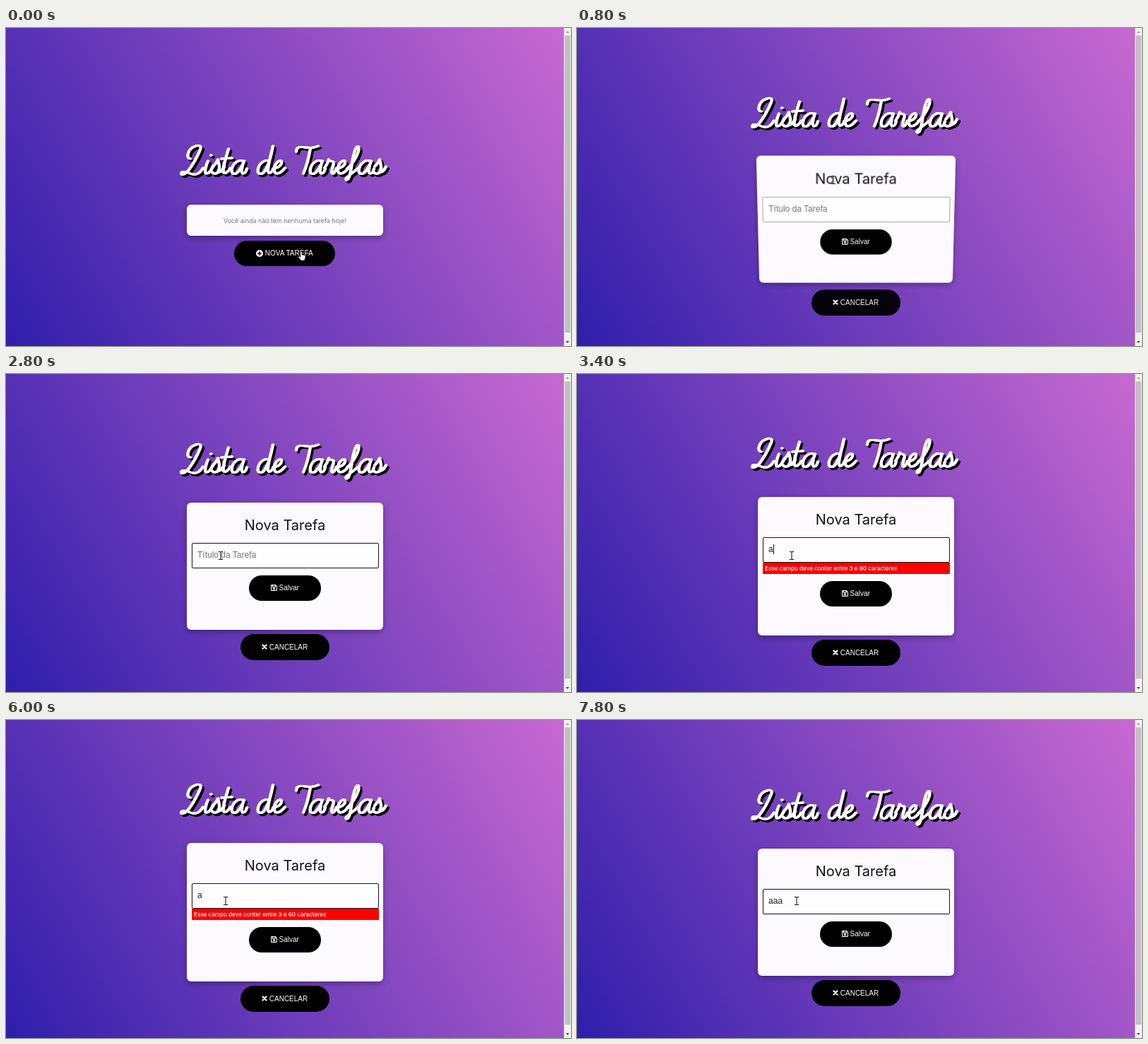
An HTML page for the animation above (8 s loop, 800 by 450 pixels).

```html
<!DOCTYPE html>
<html lang="pt-BR">
<head>
<meta charset="utf-8">
<title>Lista de Tarefas</title>
<style>
  html, body { margin: 0; width: 100%; height: 100%; overflow: hidden; }
  #stage { position: relative; width: 800px; height: 450px; overflow: hidden; }
  #stage * { box-sizing: border-box; }
  #stage > *, #form > * { position: absolute; }
  #stage svg { overflow: visible; }
  .page { left: 0; top: 0; width: 790px; height: 450px; background: linear-gradient(60deg, #2f1eab, #c869d1); }

  #scrollbar { left: 790px; top: 0; }
  #title { left: 0; top: 207px; width: 1px; height: 1px; }
  .form #title { top: 140px; }
  .error #title { top: 132px; }

  .card { left: 256px; width: 278px; border-radius: 6px; background: #fcfafe; box-shadow: 0 3px 9px rgba(0, 0, 0, .32); }
  #empty { top: 249.5px; height: 44.5px; font: 300 9px/45px Inter, sans-serif; color: #555; text-align: center; }
  #form { top: 182px; height: 179.5px; }
  .error #form { top: 174px; height: 195.5px; }
  h2 { left: 0; top: 17px; width: 100%; margin: 0; font: 400 20px/30px Inter, sans-serif; color: #111; text-align: center; }
  #field { left: 6.5px; top: 57px; width: 265.5px; height: 35.5px; padding-left: 8px; border: 1px solid #aaa; border-radius: 2px;
    background: #fefdff; font: 12px/33px "Liberation Sans", Arial, sans-serif; color: #222; white-space: pre; }
  #field.focus { border: 1.5px solid #151515; line-height: 32px; padding-left: 7.5px; }
  #field.blank { color: #757575; }
  #caret { display: inline-block; width: 1px; height: 14px; background: #111; vertical-align: -3px; }
  #message { left: 6.5px; top: 93px; width: 265.5px; height: 16px; padding-left: 3.5px; background: #f00;
    font: 500 8.1px/16px Inter, sans-serif; color: #fff; white-space: nowrap; }

  .button { display: flex; align-items: center; justify-content: center; gap: 2.5px; height: 36.5px; border-radius: 19px;
    background: #000; color: #fff; font: 10px "Liberation Sans", Arial, sans-serif; white-space: nowrap; }
  #add { left: 323px; top: 300.5px; width: 143px; }
  #save { left: 88px; top: 102.5px; width: 102px; }
  .error #save { top: 118.5px; }
  #cancel { left: 331.5px; top: 368px; width: 126.5px; }
  .error #cancel { top: 376px; }

  .form #empty, .form #add, .empty #form, .empty #cancel { display: none; }
  #stage:not(.error) #message { display: none; }
  .pointer { left: 0; top: 0; width: 1px; height: 1px; }
  #beam { mix-blend-mode: difference; }
</style>
</head>
<body>
<div id="stage" class="empty">
  <div class="page"></div>
  <svg id="scrollbar" width="10" height="450">
    <path fill="#f1f1f1" d="M0 0h10v450H0z"/>
    <path fill="#c1c1c1" d="M1 10.5h8V431H1z"/>
    <path fill="#a3a3a3" d="M2.5 7L5 4l2.5 3z"/>
    <path fill="#505050" d="M2.5 443L5 446l2.5-3z"/>
  </svg>

  <svg id="title" role="img" aria-label="Lista de Tarefas" fill="none" stroke-width="2.9" stroke-linecap="round" stroke-linejoin="round">
    <defs><g id="lettering"></g></defs>
  </svg>

  <div id="empty" class="card">Você ainda não tem nenhuma tarefa hoje!</div>
  <div id="add" class="button">
    <svg width="10" height="10"><circle cx="5" cy="5" r="5" fill="#fff"/><path d="M5 2.2v5.6M2.2 5h5.6" stroke="#000" stroke-width="1.6"/></svg>NOVA TAREFA
  </div>

  <div id="form" class="card">
    <h2>Nova Tarefa</h2>
    <div id="field"></div>
    <div id="message">Esse campo deve conter entre 3 e 60 caracteres</div>
    <div id="save" class="button">
      <svg width="9" height="9" fill="none" stroke="#fff" stroke-width="1.1"><path d="M.6 1.2q0-.6.6-.6H6.5L8.4 2.5V7.8q0 .6-.6.6H1.2q-.6 0-.6-.6zM2.4 1v2.2h3.8V1"/><circle cx="4.5" cy="5.7" r="1.1"/></svg>Salvar
    </div>
  </div>
  <div id="cancel" class="button">
    <svg width="8" height="8"><path d="M1.5 1.5l5 5M6.5 1.5l-5 5" stroke="#fff" stroke-width="2.2" stroke-linecap="round"/></svg>CANCELAR
  </div>

  <svg id="hand" class="pointer"><path transform="translate(-4)" fill="#fff" stroke="#111" stroke-width=".6" d="M4 0Q5 0 5 1.2V5L9 5.8Q10.2 6.1 10 7.6L9.3 11Q9 13 7 13H4.5Q3.5 13 2.8 11.7L0 8Q0 6.5 1.5 7L3 8.2V1.2Q3 0 4 0Z"/></svg>
  <svg id="beam" class="pointer"><path fill="none" stroke="#fff" d="M-3-5.5H-1L0-5L1-5.5H3M0-5V5M-3 5.5H-1L0 5L1 5.5H3"/></svg>
</div>

<script>
const $ = id => document.getElementById(id);
const LOOP = 8000, STEP = 200;

// Script lettering: each glyph is a pen stroke above a baseline at y = 0.
const bowl = 'M18-18C13-22 4-17 2-8C0 1 7 1 11-4';
const glyphs = {
  L: 'M14-22C8-22 10-33 17-38C24-42 31-42 28-35C25-27 17-12 10-4C7 0 1 2 1-1C1-5 8-4 14-1C20 2 27 0 32-9',
  i: 'M5-19C2-12-1-1 3-1C7-1 10-7 13-12M9-27h.5',
  s: 'M3-11C7-15 9-18 10-21C11-15 14-10 11-4C9 0 3 0 2-3M11-3C15-3 17-7 19-11',
  t: 'M11-36C8-24 2-10 4-3C5 1 10-3 14-9M1-22L16-23',
  a: bowl + 'C15-9 18-14 19-19C16-11 14-1 18-1C20-1 22-4 23-8',
  d: bowl + 'C16-11 20-24 23-40C20-26 15-10 16-4C17 1 21-3 24-8',
  e: 'M2-8C8-8 15-13 14-18C13-22 5-17 4-8C3 1 10 2 19-9',
  T: 'M1-32C1-40 8-39 14-38C21-37 26-37 32-40M21-37C19-25 15-10 11-1',
  r: 'M0-9C3-13 5-17 6-21C6-17 13-20 13-16C13-12 8-3 11-1C13 0 15-4 17-9',
  f: 'M0-8C8-14 19-33 16-39C12-42 8-24 6-10C4 2 2 9-1 8C-4 6 4 1 16-9'
};
const starts = [247, 281, 290, 304, 318, 355, 376, 410, 429, 451, 466, 483, 498, 519];
$('lettering').innerHTML = [...'ListadeTarefas']
  .map((letter, i) => `<path d="${glyphs[letter]}" transform="translate(${starts[i]})"/>`).join('');

// A broad nib: three copies side by side, over a hard black shadow.
const nib = (color, shift) => [-.8, 0, .8]
  .map(x => `<use href="#lettering" stroke="${color}" x="${x + shift}" y="${shift}"/>`).join('');
$('title').innerHTML += nib('#000', 3) + nib('#fff', 0);

function entrance(id, keyframes) {
  const animation = $(id).animate(keyframes, { delay: 46, duration: 1070, fill: 'both' });
  animation.pause();
  return animation;
}
const tilt = (offset, angle, easing = 'ease', extra = {}) =>
  ({ offset, easing, transform: `perspective(234px) rotateX(${angle}deg)`, ...extra });
const entrances = [
  entrance('form', [
    tilt(0, 90, 'ease-in', { opacity: 0 }), tilt(.4, -20, 'ease-in'),
    tilt(.6, 10, 'ease', { opacity: 1 }), tilt(.8, -5), tilt(1, 0, 'ease', { opacity: 1 })
  ]),
  entrance('cancel', [
    { opacity: 0, transform: 'translateY(100%)', easing: 'ease' },
    { opacity: 1, transform: 'none' }
  ])
];

// Pointer path as [time, x, y].
const route = [
  [0, 418, 316], [400, 406.5, 310.5], [800, 363, 215], [1200, 345, 232], [2000, 304, 257],
  [3800, 304, 257], [4400, 270, 275.5], [5000, 270, 275.5], [5600, 311, 256], [LOOP, 311, 256]
];
function pointerAt(t) {
  const next = route.findIndex(stop => stop[0] > t);
  const [t0, x0, y0] = route[next - 1], [t1, x1, y1] = route[next];
  const k = (t - t0) / (t1 - t0);
  return [x0 + (x1 - x0) * k, y0 + (y1 - y0) * k];
}

// Field contents as [time, text]; each entry also restarts the caret blink.
const typing = [[2200, ''], [3200, 'a'], [6600, 'aa'], [6800, 'aaa']];

function render(t) {
  const entry = typing.filter(([start]) => start <= t).pop();
  const text = entry ? entry[1] : '';
  const invalid = text.length > 0 && text.length < 3;
  $('stage').className = t < 200 ? 'empty' : invalid ? 'form error' : 'form';
  entrances.forEach(animation => animation.currentTime = t);

  const caret = entry && (t - entry[0]) % 1060 < 530 ? '<span id="caret"></span>' : '';
  $('field').className = (entry ? 'focus ' : '') + (text ? '' : 'blank');
  $('field').innerHTML = text ? text + caret : caret + 'Título da Tarefa';

  const [x, y] = pointerAt(t), isHand = t < 600;
  $('hand').style.display = isHand ? '' : 'none';
  $('beam').style.display = isHand ? 'none' : '';
  $(isHand ? 'hand' : 'beam').style.transform = `translate(${x}px, ${y}px)`;
}

function tick() {
  render(Math.floor(performance.now() % LOOP / STEP) * STEP);
  requestAnimationFrame(tick);
}
tick();
</script>
</body>
</html>
```
